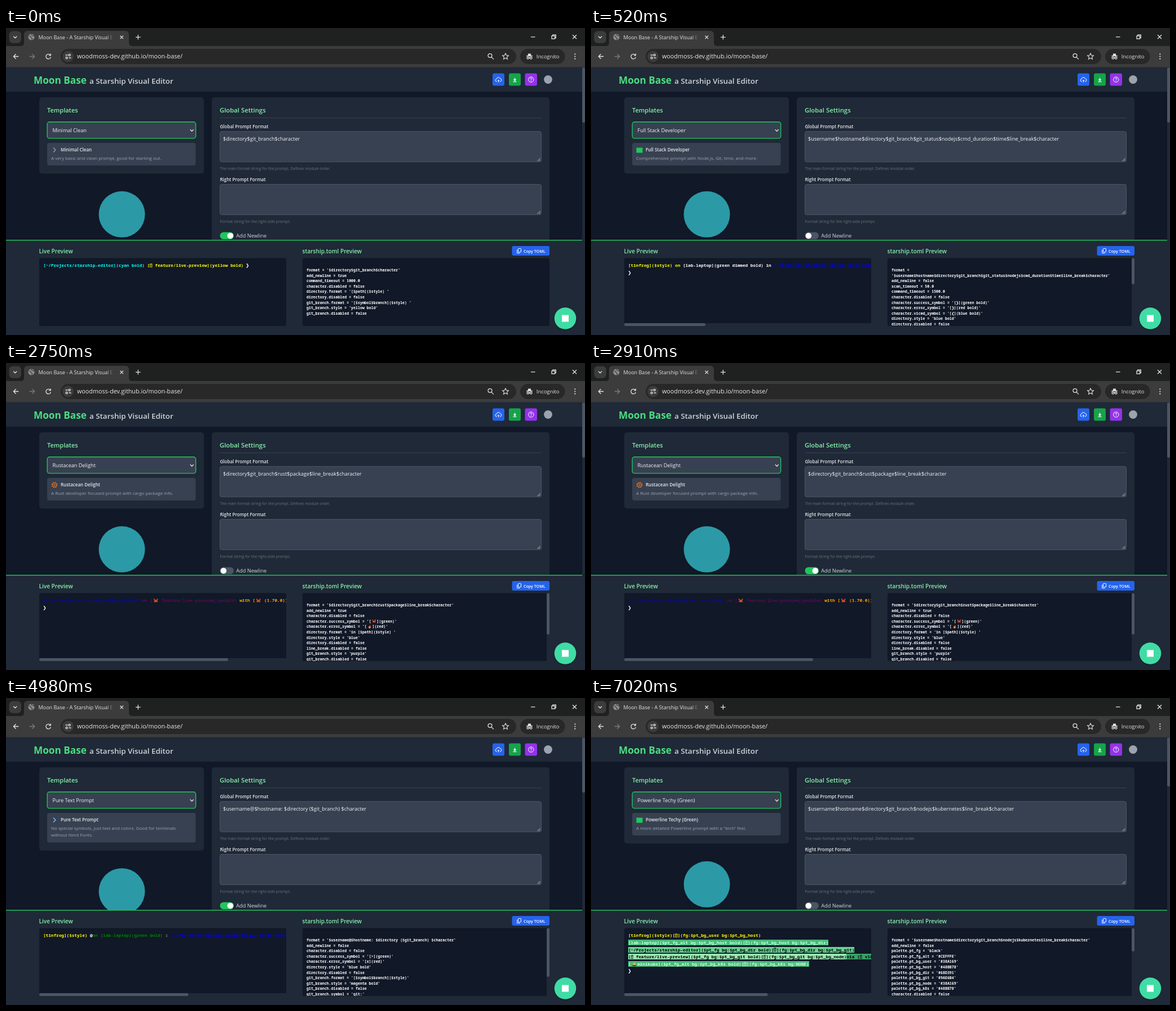
Animation, 1027 px wide and 545 px high, one loop 8 s. Source, as an HTML page:

```html
<!DOCTYPE html>
<html lang="en">
<head>
<meta charset="utf-8">
<title>Moon Base - A Starship Visual Editor</title>
<style>
html, body { margin: 0; width: 100%; height: 100%; overflow: hidden; background: #111827; }
#stage { position: absolute; left: 0; top: 0; width: 1027px; height: 545px; overflow: hidden; }
svg.page { position: absolute; left: 0; top: 0; }
svg text { font-family: "Open Sans", "Noto Sans", sans-serif; white-space: pre; }
.h { font-weight: 600; fill: #86efac; }
.label { font-weight: 600; font-size: 8px; fill: #e5e7eb; }
.hint { font-size: 6.8px; fill: #6b7280; }
.desc { font-size: 8px; fill: #9ca3af; }
.field { font-size: 9px; fill: #f3f4f6; }
.line { fill: none; stroke: #e3e3e3; stroke-width: 1.3; }
.term { position: absolute; top: 409px; margin: 0; padding: 6.4px 7px; box-sizing: border-box;
  overflow: hidden; white-space: pre; color: #fff;
  font-family: "Noto Sans Mono", "DejaVu Sans Mono", monospace; }
#live { left: 59px; width: 438px; height: 115px; font-size: 7.7px; line-height: 12.6px; font-weight: 700; }
#toml { left: 526px; width: 433px; height: 120px; font-size: 6.6px; line-height: 9.6px; font-weight: 600; }
.term i { display: inline-block; width: .6em; line-height: 1; font-style: normal;
  font-family: "DejaVu Sans", sans-serif; text-indent: -.1em; }
.term svg { height: .95em; vertical-align: -.14em; }
.emoji { width: 1.494em; }
.box { width: .6em; }
</style>
</head>
<body>
<div id="stage">
<svg class="page" width="1027" height="545" viewBox="0 0 1027 545">
  <!-- web page -->
  <rect y="69" width="1027" height="476" fill="#111827"/>
  <rect y="69" width="1022" height="44" fill="#1f2937"/>
  <text x="49" y="98.8" font-size="17.2" font-weight="700" fill="#4ade80">Moon Base</text>
  <text x="148" y="98.6" font-size="13.4" font-weight="600" fill="#d1d5db">a Starship Visual Editor</text>
  <rect x="863" y="80.5" width="21" height="22" rx="3" fill="#2563eb"/>
  <rect x="892" y="80.5" width="21" height="22" rx="3" fill="#16a34a"/>
  <rect x="920.5" y="80.5" width="21.5" height="22" rx="3" fill="#9333ea"/>
  <g fill="none" stroke="#fff" stroke-width="1">
    <path d="M871 95h-.6a2.3 2.3 0 0 1-.2-4.6 3.3 3.3 0 0 1 6.3-.7 2.7 2.7 0 0 1 .4 5.3h-1M873.5 96.5v-4.2M871.8 93.8l1.7-1.7 1.7 1.7"/>
    <path d="M902.5 88.5v4.5M900.4 91.2l2.1 2.1 2.1-2.1M899.5 95.3h6" stroke-width="1.3"/>
    <circle cx="931.3" cy="91.5" r="4.7"/>
    <path d="M929.8 90.4a1.5 1.5 0 1 1 2.2 1.2q-.7.3-.7 1M931.3 93.4v.9"/>
  </g>
  <circle cx="961.5" cy="91.5" r="7.4" fill="#9ca3af"/>

  <rect id="card" x="59" y="123" width="292" rx="5" fill="#1f2937"/>
  <text class="h" x="73" y="150" font-size="11">Templates</text>
  <rect x="73.2" y="166.7" width="263.4" height="29.2" rx="4" fill="#374151" stroke="#22c55e" stroke-width="1.4"/>
  <text id="pick" x="82.5" y="185.3" font-size="9.1" fill="#f3f4f6">Minimal Clean</text>
  <path d="M326.7 180.3l3 3 3-3" class="line"/>
  <rect id="info" x="73" y="204" width="263.5" rx="4" fill="#374151"/>
  <g id="icon"></g>
  <text id="name" class="label" x="97" y="219.4"></text>
  <text id="desc1" class="desc" x="80" y="234"></text>
  <text id="desc2" class="desc" x="80" y="246.4"></text>
  <circle id="badge" cx="205.5" r="41" fill="#2b9aa6"/>

  <rect x="365" y="123" width="599" height="300" rx="5" fill="#1f2937"/>
  <text class="h" x="379" y="150" font-size="11.3">Global Settings</text>
  <path d="M379.5 159.5H949.5" stroke="#374151"/>
  <text class="label" x="379.5" y="178.4">Global Prompt Format</text>
  <text class="label" x="379.5" y="272">Right Prompt Format</text>
  <g fill="#374151" stroke="#4b5563">
    <rect x="379.5" y="183.7" width="570" height="54" rx="3"/>
    <rect x="379.5" y="277.5" width="570" height="54" rx="3"/>
  </g>
  <path d="M942.5 236.3l5-5M945.5 236.3l2-2M942.5 330l5-5M945.5 330l2-2" stroke="#e5e7eb" stroke-width=".8"/>
  <text id="format" class="field" x="385" y="199.7"></text>
  <text class="hint" x="379.5" y="251.6">The main format string for the prompt. Defines module order.</text>
  <text class="hint" x="379.5" y="345.6">Format string for the right-side prompt.</text>
  <rect id="track" x="379.5" y="362.5" width="24.5" height="12.6" rx="6.3"/>
  <circle id="knob" cy="368.8" r="5.3" fill="#fff"/>
  <text x="408.3" y="372.3" font-size="9.2" fill="#d1d5db">Add Newline</text>

  <!-- footer -->
  <rect y="376" width="1022" height="169" fill="#1f2937"/>
  <rect y="376" width="1022" height="1.4" fill="#22c55e"/>
  <text class="h" x="58.5" y="399.7" font-size="10.1">Live Preview</text>
  <text class="h" x="525.5" y="399.7" font-size="10.1">starship.toml Preview</text>
  <rect x="897.5" y="387" width="66.5" height="17" rx="3" fill="#2563eb"/>
  <g fill="none" stroke="#fff"><rect x="908.5" y="391.5" width="5" height="6.3" rx=".8"/><path d="M906.7 393.5v6.2h4.8"/></g>
  <text x="918" y="398.6" font-size="7.1" font-weight="600" fill="#fff">Copy TOML</text>
  <rect x="59" y="408.5" width="438" height="120.5" rx="3" fill="#111827"/>
  <rect x="526" y="408.5" width="438" height="120.5" rx="3" fill="#111827"/>
  <g id="bars">
    <rect x="59" y="524" width="438" height="5" fill="#1f2937"/>
    <rect x="959" y="408.5" width="5" height="120.5" fill="#1f2937"/>
    <rect id="hbar" x="59" y="524" height="5" rx="2.5" fill="#4b5563"/>
    <rect id="vbar" x="959" y="408.5" width="5" rx="2.5" fill="#4b5563"/>
  </g>
  <rect x="1022" y="69" width="5" height="476" fill="#1f2937"/>
  <rect id="pagebar" x="1022" y="70" width="5" rx="2.5" fill="#4b5563"/>

  <!-- browser -->
  <rect width="1027" height="33" fill="#1f2020"/>
  <rect y="32" width="1027" height="37.5" fill="#3c3c3c"/>
  <path d="M26 32q6 0 6-6V12q0-7 7-7H211q7 0 7 7V26q0 6 6 6z" fill="#3c3c3c"/>
  <rect x="5.5" y="5.5" width="21.5" height="21.5" rx="6.5" fill="#3c3c3c"/>
  <path class="line" d="M13.2 14.8l3 3 3-3M202.5 13.7l5.4 5.4M207.9 13.7l-5.4 5.4M230 16.3h8.6M234.3 12v8.6M931 15.8h7.5M1005 12.2l7 7M1012 12.2l-7 7"/>
  <g class="line"><rect x="968" y="14" width="5.5" height="5.2"/><path d="M969.8 14v-1.8h5.5v5.3h-1.8"/></g>
  <circle cx="45" cy="16" r="5.6" fill="#8b8f94"/>
  <path d="M40.5 14q3 0 3.5 2t2 2.2-.5 3M45.5 10.8q-1 2.2 1.5 2.4t3.2 2" fill="none" stroke="#3c3c3c" stroke-width="1.2"/>
  <text x="57.5" y="20.2" font-size="9.05" fill="#e3e3e3">Moon Base - A Starship Visual E</text>
  <defs><linearGradient id="fade"><stop stop-color="#3c3c3c" stop-opacity="0"/><stop offset="1" stop-color="#3c3c3c"/></linearGradient></defs>
  <rect x="178" y="8" width="13" height="18" fill="url(#fade)"/>
  <rect x="97" y="37" width="808" height="27" rx="13.5" fill="#282828"/>
  <rect x="912" y="37" width="79.5" height="27" rx="13.5" fill="#282828"/>
  <circle cx="110" cy="50.5" r="10" fill="#3c3c3c"/>
  <g class="line">
    <path d="M22.3 50.5H13.5M17.6 46.2l-4.2 4.3 4.2 4.3"/>
    <path d="M41.8 50.5h8.8M46.5 46.2l4.2 4.3-4.2 4.3" stroke="#7b7b7b"/>
    <path d="M78.8 48.2a4.3 4.3 0 1 0 .6 3.4M79.3 45.5v3.2h-3.2"/>
    <path d="M105.6 48h4M111.5 53h4"/><circle cx="112.6" cy="48" r="1.6"/><circle cx="107.6" cy="53" r="1.6"/>
    <circle cx="858.5" cy="49" r="3.4"/><path d="M861 51.6l4 4"/>
    <path d="M886 45l1.6 3.5 3.8.4-2.8 2.6.8 3.8-3.4-2-3.4 2 .8-3.8-2.8-2.6 3.8-.4z" stroke-width="1.1"/>
    <circle cx="925.8" cy="53.3" r="1.8"/><circle cx="931.2" cy="53.3" r="1.8"/><path d="M923 49.6h11M927.6 53h1.8"/>
  </g>
  <path d="M925.3 49.2l1.1-4 2.1.6 2.1-.6 1.1 4z" fill="#e3e3e3"/>
  <text x="126" y="54.3" font-size="10.75" fill="#e8e8e8">woodmoss-dev.github.io/moon-base/</text>
  <text x="940.8" y="54" font-size="9.4" fill="#e3e3e3">Incognito</text>
  <g fill="#e3e3e3"><circle cx="1009.3" cy="46.3" r="1.1"/><circle cx="1009.3" cy="50.5" r="1.1"/><circle cx="1009.3" cy="54.7" r="1.1"/></g>
</svg>
<div id="live" class="term"></div>
<div id="toml" class="term"></div>
<svg class="page" width="1027" height="545">
  <circle cx="992" cy="516.5" r="20.3" fill="#000" opacity=".18"/>
  <circle cx="992" cy="515.5" r="19.3" fill="#40dca5"/>
  <rect x="986" y="509.5" width="12" height="12" fill="#fff"/>
</svg>
</div>
<script>
const LOOP = 8000;
const $ = id => document.getElementById(id);
const set = (id, attrs) => Object.entries(attrs).forEach(([k, v]) => $(id).setAttribute(k, v));

const emoji = body => `<svg class="emoji" viewBox="0 0 12 9">${body}</svg>`;
const glyphs = {
  '❯': '<i>❯</i>',
  '❮': '<i>❮</i>',
  '□': '<svg class="box" viewBox="0 0 5 8" fill="none" stroke="currentColor" stroke-width=".8"><path d="M.6.8h3.8v6.4H.6zM1.6 3q0-1 .9-1t.9 1-.9 1.3M2.5 5.2v.9"/></svg>',
  '🦀': emoji('<g fill="#f4511e" stroke="#f4511e"><ellipse cx="6" cy="5.2" rx="3.2" ry="2.1"/><path d="M3 4L2 2M9 4l1-2M3 6L1.5 7.8M9 6l1.5 1.8M4.3 7l-.8 1.4M7.7 7l.8 1.4" fill="none"/><circle cx="2.5" cy="1.6" r=".8"/><circle cx="9.5" cy="1.6" r=".8"/></g><path d="M4.8 3.5v1M7.2 3.5v1" stroke="#222"/>'),
  '🔥': emoji('<path d="M6.2 0q3.3 3 3 5.6a3.2 3.2 0 0 1-6.4 0Q2.9 4 4.2 2.8l.6 1.2Q6.5 2.500 6.200 0z" fill="#f4511e"/><path d="M6 4q1.700 1.700 1.500 3a1.500 1.500 0 0 1-3 0Q4.500 5.500 6 4z" fill="#ffca28"/>'),
  '⛵': emoji('<path d="M6 0l4 6H2z" fill="#f6b73c"/><path d="M1.200 6.500h9.600L9.400 8.800H2.600z" fill="#33302c"/>')
};
const rich = s => s.replace(/&/g, '&amp;').replace(/</g, '&lt;').replace(/>/g, '&gt;')
  .replace(/[❯❮□🦀🔥⛵]/gu, c => glyphs[c]);
const paint = runs => runs.map(([style, text]) => {
  const [color, back = 'none', weight = 700] = style.split(' ');
  return `<span style="color:${color};background:${back};font-weight:${weight}">${rich(text)}</span>`;
}).join('');

const chevron = color => `<path d="M84 212.500l4 4-4 4" fill="none" stroke="${color}" stroke-width="1.200"/>`;
const square = '<rect x="80.500" y="212.500" width="11" height="9" fill="#22c55e"/>';
const gear = '<g fill="none" stroke="#f97316"><circle cx="86" cy="216.500" r="1.600"/><circle cx="86" cy="216.500" r="3.900"/><circle cx="86" cy="216.500" r="4.700" stroke-dasharray="1.850 1.840" stroke-width="1.200"/></g>';

const path = '[~/Projects/starship-editor]';
const branch = 'feature/live-preview]';

const scenes = [
  {
    at: 0, name: 'Minimal Clean', icon: chevron('#9ca3af'),
    desc: ['A very basic and clean prompt, good for starting out.'],
    format: '$directory$git_branch$character',
    live: [['#0ff', path + '(cyan bold) '], ['#ff0', `[□ ${branch}(yellow bold) `], ['#fff', '❯']],
    toml: `add_newline = true
command_timeout = 1000.0
character.disabled = false
directory.format = '[$path]($style) '
directory.disabled = false
git_branch.format = '[$symbol$branch]($style) '
git_branch.style = 'yellow bold'
git_branch.disabled = false`
  },
  {
    at: 440, name: 'Full Stack Developer', icon: square, bars: [144, 46.5], wrap: true,
    desc: ['Comprehensive prompt with Node.js, Git, time, and more.'],
    format: '$username$hostname$directory$git_branch$git_status$nodejs$cmd_duration$time$line_break$character',
    live: [['#ff0', '[tinfrog]($style) on '], ['#fff', '[lab-laptop](green dimmed bold) in '],
      ['#00f', path + '(blue bold) on'], ['#fff', '\n❯']],
    toml: `add_newline = false
scan_timeout = 50.0
command_timeout = 1500.0
character.disabled = false
character.success_symbol = '[❯](green bold)'
character.error_symbol = '[❯](red bold)'
character.vicmd_symbol = '[❮](blue bold)'
directory.style = 'blue bold'
directory.disabled = false`
  },
  {
    at: 2750, name: 'Rustacean Delight', icon: gear, bars: [335, 73.5],
    desc: ['A Rust developer focused prompt with cargo package info.'],
    format: '$directory$git_branch$rust$package$line_break$character',
    live: [['#00f none 400', `in ${path}(blue) `], ['#800080 none 400', `on [🦀 ${branch}(purple) `],
      ['#ffa500', 'with [🦀 (1.70.0)]'], ['#fff', '\n❯']],
    toml: `add_newline = true
character.disabled = false
character.success_symbol = '[🦀](green)'
character.error_symbol = '[🔥](red)'
directory.format = 'in [$path]($style) '
directory.style = 'blue'
directory.disabled = false
line_break.disabled = false
git_branch.style = 'purple'
git_branch.disabled = false`
  },
  {
    at: 4980, name: 'Pure Text Prompt', icon: chevron('#93c5fd'), bars: [264.5, 86.5],
    desc: ['No special symbols, just text and colors. Good for terminals', 'without Nerd Fonts.'],
    format: '$username@$hostname: $directory ($git_branch) $character',
    live: [['#ff0', '[tinfrog]($style) '], ['#fff', '@'], ['#008000', 'on [lab-laptop](green bold) '],
      ['#fff', ': '], ['#00f', path + '(blue bold)[]($read_only_style)']],
    toml: `add_newline = false
character.disabled = false
character.success_symbol = '[>](green)'
character.error_symbol = '[x](red)'
directory.style = 'blue bold'
directory.disabled = false
git_branch.format = '[$symbol$branch]($style)'
git_branch.style = 'magenta bold'
git_branch.disabled = false
git_branch.symbol = 'git:'`
  },
  {
    at: 7020, name: 'Powerline Techy (Green)', icon: square, bars: [254.5, 41.5], pagebar: 87,
    desc: ['A more detailed Powerline prompt with a "tech" feel.'],
    format: '$username$hostname$directory$git_branch$nodejs$kubernetes$line_break$character',
    live: [['#ff0', '[tinfrog]($style)[□](fg:$pt_bg_user bg:$pt_bg_host)\n'],
      ['#ceffe8 #48bb78', '[lab-laptop]($pt_fg_alt bg:$pt_bg_host bold)[□](fg:$pt_bg_host bg:$pt_bg_dir)'], ['#fff', '\n'],
      ['#000 #68d391', path + '($pt_fg bg:$pt_bg_dir bold)[□](fg:$pt_bg_dir bg:$pt_bg_git)'], ['#fff', '\n'],
      ['#000 #9ae6b4', `[□ ${branch}($pt_fg bg:$pt_bg_git bold)[□](fg:$pt_bg_git bg:$pt_bg_node)`],
      ['#000 #38a169', 'via [□ v18.0.0]'], ['#fff', '\n'],
      ['#ceffe8 #48bb78', '[⛵minikube]($pt_fg_alt bg:$pt_bg_k8s bold)[□](fg:$pt_bg_k8s bg:NONE)'], ['#fff', '\n❯']],
    toml: `add_newline = false
palette.pt_fg = 'black'
palette.pt_fg_alt = '#CEFFFE'
palette.pt_bg_user = '#38A169'
palette.pt_bg_host = '#48BB78'
palette.pt_bg_dir = '#68D391'
palette.pt_bg_git = '#9AE6B4'
palette.pt_bg_node = '#38A169'
palette.pt_bg_k8s = '#48BB78'
character.disabled = false`
  }
];

// time, switch position (1 = on)
const toggles = [[0, 1], [520, 0], [2840, 0.5], [2910, 1], [5040, 0]];

function showScene(s) {
  const grow = s.desc[1] ? 12.4 : 0;
  $('pick').textContent = $('name').textContent = s.name;
  $('desc1').textContent = s.desc[0];
  $('desc2').textContent = s.desc[1] || '';
  $('format').textContent = s.format;
  $('icon').innerHTML = s.icon;
  set('card', { height: 135.5 + grow });
  set('info', { height: 40 + grow });
  set('badge', { cy: 330.8 + grow });
  set('pagebar', { height: s.pagebar || 98 });
  set('bars', { visibility: s.bars ? 'visible' : 'hidden' });
  if (s.bars) {
    set('hbar', { width: s.bars[0] });
    set('vbar', { height: s.bars[1] });
  }
  $('live').innerHTML = paint(s.live);
  $('toml').innerHTML = rich(`\nformat =${s.wrap ? '\n' : ' '}'${s.format}'\n${s.toml}`);
}

function showToggle(p) {
  const mix = (a, b) => Math.round(a + (b - a) * p);
  set('track', { fill: `rgb(${mix(75, 34)},${mix(85, 197)},${mix(99, 94)})` });
  set('knob', { cx: 385.8 + 12 * p });
}

const start = performance.now();
let scene, toggle;
function frame() {
  const t = (performance.now() - start) % LOOP;
  const s = scenes.filter(x => x.at <= t).pop();
  const p = toggles.filter(x => x[0] <= t).pop()[1];
  if (s !== scene) showScene(scene = s);
  if (p !== toggle) showToggle(toggle = p);
  requestAnimationFrame(frame);
}
frame();
</script>
</body>
</html>
```
